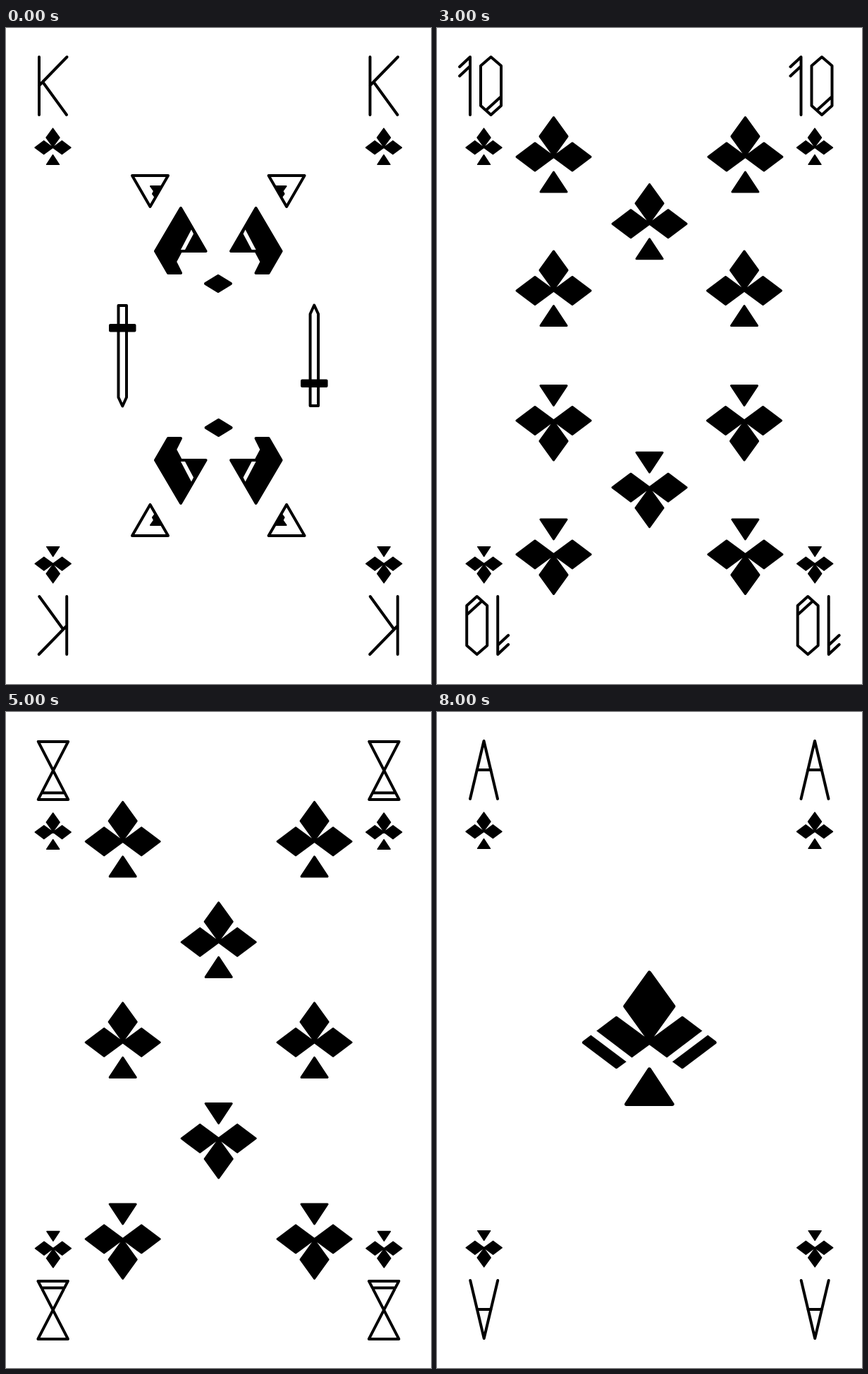
These frames come from a looping animation (603x929 px, 9 s). An HTML page:

```html
<!DOCTYPE html>
<html lang="en">
<head>
<meta charset="utf-8">
<title>Suit of clubs</title>
<style>
  html, body { margin: 0; width: 100%; height: 100%; overflow: hidden; background: #fff; }
  svg { display: block; width: 603px; height: 929px; }
</style>
</head>
<body>
<svg viewBox="0 0 603 929" stroke-linecap="round" stroke-linejoin="round"></svg>
<script>
const svg = document.querySelector('svg');
const MID_X = 301.3, MID_Y = 464;

const group = (transform, body) => `<g transform="${transform}">${body}</g>`;
const line = d => `<path d="${d}" fill="none" stroke="#000" stroke-width="4"/>`;
const solid = (d, w = 3) => `<path d="${d}" stroke="#000" stroke-width="${w}"/>`;
const blank = d => `<path d="${d}" fill="#fff"/>`;
const disc = (x, y, r) => `<circle cx="${x}" cy="${y}" r="${r}"/>`;
const ring = (x, y, r) => `<circle cx="${x}" cy="${y}" r="${r}" fill="#fff" stroke="#000" stroke-width="4"/>`;

// Half-turn copy about a point, and left-right copy about the middle
const turned = (body, x = MID_X) => body + group(`rotate(180 ${x} ${MID_Y})`, body);
const mirrored = body => body + group(`translate(${2 * MID_X}) scale(-1 1)`, body);

const CLUB = 'M0-56L19.5-29L0-2L-19.5-29Z' +
  'M-52.5 0L-26.5-19.5L0 0L-26.5 19.5Z' +
  'M52.5 0L26.5-19.5L0 0L26.5 19.5Z' +
  'M0 21.5L18.5 49.5H-18.5Z';

const club = (x, y, scale = 1) => group(`translate(${x} ${y}) scale(${scale})`, solid(CLUB));
const flipped = (x, y) => group(`translate(${x} ${2 * MID_Y - y}) rotate(180)`, solid(CLUB));

function corners(glyph) {
  const column = turned(line(glyph) + club(66.5, 169.3, .485), 66.6);
  return column + group('translate(469.5)', column);
}

const LEFT = 165.5, RIGHT = 437.4;
const pair = (y, right = RIGHT) => club(LEFT, y) + club(right, y);
const bothEnds = (y, right = RIGHT) => pair(y, right) + flipped(LEFT, y) + flipped(right, y);
const centre = y => club(301.5, y);

function king() {
  const head = mirrored(
    line('M179 209H230L204.5 253Z') +
    solid('M205 224H221L211 239L208 235L210 231Z', 2) +
    solid('M248 255L283.5 316H248L240 331L248 347H230L212 316Z', 4) +
    blank('M263 285.5L266 291.5L254 314H248Z')
  ) + solid('M283 362L301 351L319 362L301 373Z', 4);
  const sword = line('M159.5 393H171V523L165.3 535.5L159.5 523Z') +
    solid('M148 421H182.5V428.5H148Z', 4);
  return turned(head + sword);
}

function queen() {
  const head = mirrored(
    line('M301 137L265 173L301 209') +
    line('M265 191H230V226L212 244V292') +
    solid('M266 211L281 226L266 241L251 226Z') +
    blank('M266 218L273 226L266 234Z') +
    line('M248 262V310L266 328')
  ) + solid('M301 346L315 361L301 376L287 361Z');
  const flower = line('M165.3 430V535M165.3 506L148 489M165.3 506L182 489') +
    solid('M165.3 394L183 412L165.3 430L147 412Z') +
    blank('M165.3 404L173 412L165.3 420L157 412Z');
  return turned(head + flower);
}

function jack() {
  const eye = x => disc(x, 224, 15) + blank(`M${x + 1} 214.5H${x + 6}V234H${x + 1}Z`);
  const arms = mirrored(
    line('M248.5 247A18 18 0 0 0 230.5 265V292') + disc(221, 292, 11) +
    line('M284.5 247A18 18 0 0 0 266 265V327') + ring(256.5, 327.3, 9)
  );
  const head = ring(MID_X, 172.3, 36) + line('M290.5 138.5V206') + eye(265.5) + eye(336.8) +
    arms + line(`M${MID_X} 265V353`) + ring(MID_X, 363.5, 9);
  const axe = solid('M127 476H137L152 492H160V510H152L137 526.5H127L131.5 501Z') +
    solid('M171 493.5L183.5 501L171 508.5Z') +
    '<rect x="158.2" y="393.5" width="12.6" height="140.5" rx="6.3" fill="#fff" stroke="#000" stroke-width="4"/>';
  return turned(head + axe);
}

function ace() {
  const slit = 'M211 452L219 446L285 496L277 501.5Z';
  return club(MID_X, 468, 1.765) + mirrored(blank(slit));
}

const K = 'M47 41V123M86.5 41L47 81.5M52.5 77L86 123';
const Q = 'M47 61A19.5 19.5 0 0 1 86 61V103A19.5 19.5 0 0 1 47 103ZM70 106L86 123';
const J = 'M82 40.5V107.5A15.2 15.2 0 0 1 51.6 107.5';
const TEN = 'M47 123V41L32 55M47 54L32 68M76.5 41L91 53.5V110L76.5 123L62 110V53.5ZM91 97L69.5 116.5';
const NINE = 'M56 123L86 41H47L70 81M51.5 50H82';
const EIGHT = 'M45.5 41H88L45.5 123H88ZM50.5 113.5H83';
const SEVEN = 'M47 41H86L56 123M47 50H82';
const SIX = 'M77 41L47 123H86L63 83M51 113.5H81';
const A = 'M47 123L66.5 41L86 123M56.5 82H76.5';

const card = (glyph, art, dx = 0, dy = 0) => group(`translate(${dx} ${dy})`, corners(glyph) + art);
const LOW = .9;

const cards = [
  card(K, king()),
  card(Q, queen()),
  card(J, jack(), .4, .3),
  card(TEN, bothEnds(182.5) + bothEnds(372, 436) + centre(277.3) + flipped(301.5, 277.3)),
  card(NINE, bothEnds(182.5) + bothEnds(372, 436) + centre(467), .2, LOW),
  card(EIGHT, bothEnds(182.5) + pair(467) + centre(325) + flipped(301.5, 325), .2, LOW),
  card(SEVEN, bothEnds(182.5) + pair(467) + centre(325), .2, LOW),
  card(SIX, bothEnds(182.5) + pair(467), .2, LOW),
  card(A, ace())
];

let shown = -1;
function draw() {
  const index = Math.floor(performance.now() / 1000) % cards.length;
  if (index !== shown) svg.innerHTML = cards[shown = index];
  requestAnimationFrame(draw);
}
draw();
</script>
</body>
</html>
```
